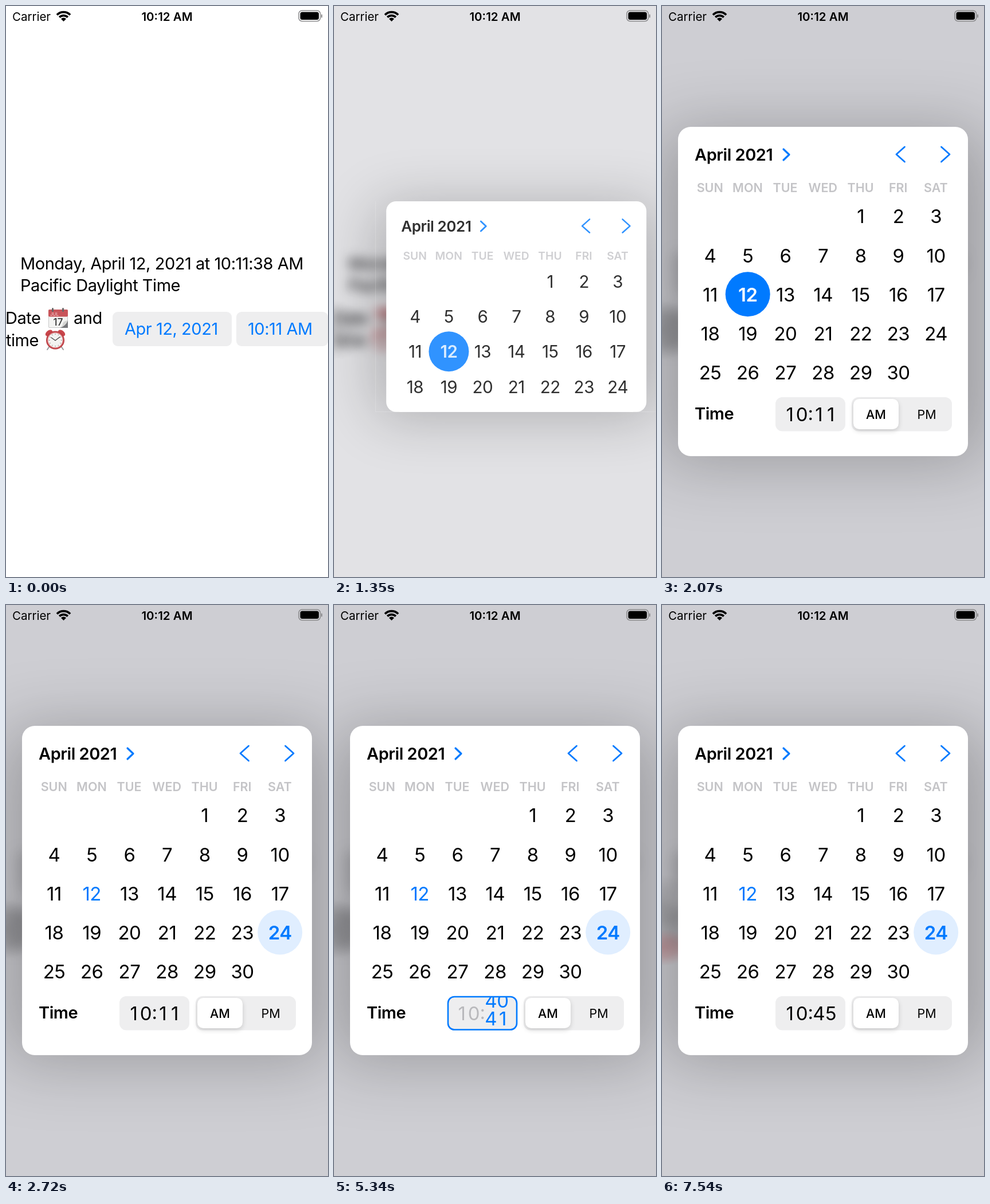
Recreate the animation shown at these times as an HTML page with a canvas. Size 562x997 px, loop 8 s.

```html
<!DOCTYPE html>
<html lang="en">
<head>
<meta charset="utf-8">
<title>Date picker</title>
<style>
html, body { margin: 0; width: 100%; height: 100%; overflow: hidden; background: #fff; }
canvas { display: block; width: 562px; height: 997px; }
</style>
</head>
<body>
<canvas id="stage" width="562" height="997"></canvas>
<script>
const W = 562, H = 997, LOOP = 8000;
const OPEN = 1283, OPENED = 2070, PICK_DAY = 2720;
const SPIN = 4280, SPUN = 6310, RELAYOUT = 5990, BLUR_FIELD = 7540;
const BLUE = '#007aff', FILL = '#eeeeef', BLACK = '#000';
const CHIP = { x: 185, y: 534, w: 377, h: 60 };
const CARD = { x: 28, y: 211, w: 506, h: 575 };

const screen = document.getElementById('stage').getContext('2d');
let g = screen;

const clamp = v => Math.max(0, Math.min(1, v));
const mix = (a, b, p) => a + (b - a) * p;

function text(s, x, y, size, color = BLACK, weight = 400, align = 'left') {
  g.font = `${weight} ${size}px Inter, "Liberation Sans", sans-serif`;
  g.letterSpacing = (size > 25 ? -0.016 * size : 0) + 'px';
  g.textAlign = align;
  g.fillStyle = color;
  g.fillText(s, x, y);
}

function box(x, y, w, h, r, color) {
  g.beginPath();
  g.roundRect(x, y, w, h, r);
  g.fillStyle = color;
  g.fill();
}

function disc(x, y, r, color) {
  g.beginPath();
  g.arc(x, y, r, 0, 7);
  g.fillStyle = color;
  g.fill();
}

function line(points, width, color) {
  g.beginPath();
  points.forEach(([x, y]) => g.lineTo(x, y));
  g.lineWidth = width;
  g.lineCap = g.lineJoin = 'round';
  g.strokeStyle = color;
  g.stroke();
}

function shadow(color, blur, dy) {
  g.shadowColor = color;
  g.shadowBlur = blur;
  g.shadowOffsetY = dy;
}

const noShadow = () => shadow('transparent', 0, 0);

// Chevron with its tip at x; dx is negative when it points right.
const chevron = (x, y, dx, dy, width) =>
  line([[x + dx, y - dy], [x, y], [x + dx, y + dy]], width, BLUE);

function calendarIcon() {
  box(74, 530, 34, 32, 2, '#c9c9c9');
  box(75, 531, 32, 30, 1, '#f4f4f2');
  box(74, 530, 34, 12.5, 2, '#c8555a');
  text('JUL', 77, 541, 8, '#f0c4c4', 500);
  text('17', 91, 557.5, 17, '#333', 500, 'center');
  g.beginPath();
  g.moveTo(108, 549);
  g.quadraticCurveTo(104, 559, 94, 562);
  g.lineTo(108, 562);
  g.fillStyle = '#77777a';
  g.fill();
  g.beginPath();
  g.moveTo(107, 549);
  g.quadraticCurveTo(99, 551, 99, 555);
  g.quadraticCurveTo(99, 559, 94, 561);
  g.quadraticCurveTo(104, 559, 107, 549);
  g.fillStyle = '#d5d5d3';
  g.fill();
  box(80, 527, 3, 7, 1.5, '#666');
  box(98, 527, 3, 7, 1.5, '#666');
}

function clockIcon() {
  line([[76, 594], [72, 600]], 2, '#9b9b9d');
  line([[96, 594], [100, 600]], 2, '#9b9b9d');
  for (const side of [-1, 1]) {
    g.beginPath();
    g.ellipse(86 + side * 11, 571, 7, 4.5, side * 0.65, 0, 7);
    g.fillStyle = '#c9464b';
    g.fill();
  }
  disc(86, 583.5, 16, '#b93a40');
  disc(86, 583.5, 14.2, '#d9777a');
  disc(86, 583.5, 12.6, '#f3f3f1');
  for (let i = 0; i < 12; i++) {
    const a = i * Math.PI / 6, c = Math.cos(a), s = Math.sin(a);
    line([[86 + 10 * c, 583.5 + 10 * s], [86 + 11 * c, 583.5 + 11 * s]], 1, '#777');
  }
  line([[79, 579], [86, 584], [94, 578]], 1.3, '#444');
}

function chips() {
  box(186, 534, 208, 60, 9, FILL);
  box(402, 534, 160, 60, 9, FILL);
  text('Apr 12, 2021', 207, 574, 29, BLUE);
  text('10:11 AM', 422, 574, 29, BLUE);
}

function page() {
  g.fillStyle = '#fff';
  g.fillRect(0, 0, W, H);
  text('Monday, April 12, 2021 at 10:11:38 AM', 25, 459.5, 29);
  text('Pacific Daylight Time', 25, 498, 29);
  text('Date', -1, 555, 29);
  text('and', 118, 555, 29);
  text('time', 0, 593.5, 29);
  calendarIcon();
  clockIcon();
}

function statusBar() {
  text('Carrier', 11, 26, 20.5);
  text('10:12 AM', 281, 26, 20.5, BLACK, 600, 'center');
  const arc = (r, width) => {
    g.beginPath();
    g.arc(100.5, 27, r, -Math.PI * 0.75, -Math.PI * 0.25);
    g.lineWidth = width;
    g.lineCap = 'butt';
    g.strokeStyle = BLACK;
    g.stroke();
  };
  arc(16.4, 3.6);
  arc(10.4, 3.6);
  arc(3.2, 6.4);
  g.beginPath();
  g.roundRect(511, 8, 37.5, 18.5, 5.5);
  g.lineWidth = 1.5;
  g.strokeStyle = '#8a8a8c';
  g.stroke();
  box(513.5, 10.5, 32.5, 13.5, 3.5, BLACK);
  box(550, 14.5, 2, 6, 1, '#8a8a8c');
}

function days(t) {
  const picked = t < PICK_DAY ? 12 : 24;
  for (let d = 1; d <= 30; d++) {
    const slot = d + 3;
    const x = 84 + 65.7 * (slot % 7), y = 367.3 + 68.2 * Math.floor(slot / 7);
    const today = d === 12, on = d === picked;
    if (on) disc(x, y - 0.5, 39, today ? BLUE : '#e0eeff');
    const color = on && today ? '#fff' : on || today ? BLUE : BLACK;
    text(d, x, y + 12, 33, color, on ? 600 : 400, 'center');
  }
}

// Digits with a fixed pitch.
const digits = (s, x, y, color) =>
  [...String(s)].forEach((c, i) => text(c, x + 20.8 * i, y, 33, color, 400, 'center'));

function minuteAt(t) {
  const k = 1.755, total = (SPUN - SPIN) / 1000;
  const s = Math.min(total, (t - SPIN) / 1000), end = Math.exp(-k * total);
  return 45 - 33 * (Math.exp(-k * s) - end) / (1 - end);
}

function timeField(t) {
  const active = t >= SPIN && t < BLUR_FIELD;
  const color = active ? '#b9b9bc' : BLACK;
  box(198, 683, 122, 59.5, 12, FILL);
  digits('10', 223, 725, color);
  text(':', 259, 722.5, 33, color, 400, 'center');
  if (!active) {
    digits(t < SPIN ? 11 : 45, 273.6, 725, BLACK);
    return;
  }
  const v = minuteAt(t);
  g.save();
  g.beginPath();
  g.roundRect(199, 684, 120, 57.5, 11);
  g.clip();
  const alpha = g.globalAlpha;
  for (let n = Math.floor(v) - 1; n <= Math.floor(v) + 2; n++) {
    const d = n - v;
    g.globalAlpha = alpha * (1 - 0.5 * clamp((Math.abs(d) - 0.7) / 0.3));
    digits(n, 273.6, 724.5 + 31 * d, BLUE);
  }
  g.restore();
  g.beginPath();
  g.roundRect(199, 684, 120, 57.5, 11);
  g.lineWidth = 2.6;
  g.strokeStyle = BLUE;
  g.stroke();
}

function amPm() {
  box(331, 683, 175, 59.5, 12, FILL);
  shadow('rgba(0,0,0,.16)', 9, 3);
  box(334, 686, 79, 53, 10.5, '#fff');
  noShadow();
  text('AM', 373.5, 720.5, 21.5, BLACK, 500, 'center');
  text('PM', 462, 720.5, 21.5, BLACK, 400, 'center');
}

function picker(t) {
  text('April 2021', 57, 269.5, 29, BLACK, 600);
  chevron(222, 259.5, -10, 9.5, 3.2);
  chevron(409, 259, 14.5, 13, 2.8);
  chevron(502, 259, -14.5, 13, 2.8);
  ['SUN', 'MON', 'TUE', 'WED', 'THU', 'FRI', 'SAT'].forEach((name, i) =>
    text(name, 83.7 + 65.7 * i, 325, 21.5, '#c4c4c7', 600, 'center'));
  days(t);
  text('Time', 57, 721.5, 29, BLACK, 600);
  timeField(t);
  amPm();
}

function smudge(x, y, rx, ry, rgb, alpha) {
  g.save();
  g.translate(x, y);
  g.scale(rx, ry);
  const fade = g.createRadialGradient(0, 0, 0, 0, 0, 1);
  fade.addColorStop(0, `rgba(${rgb},${alpha})`);
  fade.addColorStop(0.5, `rgba(${rgb},${alpha * 0.7})`);
  fade.addColorStop(1, `rgba(${rgb},0)`);
  g.fillStyle = fade;
  g.fillRect(-1, -1, 2, 2);
  g.restore();
}

function backdrop(t, p) {
  g.fillStyle = '#fff';
  g.fillRect(0, 0, W, H);
  g.filter = p > 0 ? `blur(${16 * p}px)` : 'none';
  g.drawImage(base, 0, 0);
  g.filter = 'none';
  g.fillStyle = `rgba(12,12,35,${0.2 * p})`;
  g.fillRect(0, 0, W, H);
  if (t < RELAYOUT) {
    smudge(0, 566, 60, 52, '90,90,92', 0.3 * p);
  } else {
    smudge(0, 525, 60, 55, '100,100,102', 0.26 * p);
    smudge(0, 598, 55, 32, '190,95,100', 0.4 * p);
  }
}

// Draws a layer laid out in `home` so that it follows the card.
function follow(card, home, alpha, draw) {
  if (alpha <= 0) return;
  const s = card.w / home.w;
  g.save();
  g.globalAlpha = alpha;
  g.translate(card.x, card.y);
  g.scale(s, s);
  g.translate(-home.x, -home.y);
  draw();
  g.restore();
}

function popover(t, p) {
  const c = {};
  for (const key in CARD) c[key] = mix(CHIP[key], CARD[key], p);
  const r = mix(10, 22, p), spread = 30 * p;
  shadow(`rgba(0,0,0,${mix(0.2, 0.26, p)})`, mix(70, 120, p), 8);
  box(c.x - spread, c.y, c.w + 2 * spread, c.h, r, '#fff');
  noShadow();
  // Repaint the backdrop tint where the shadow caster is wider than the card.
  if (spread > 0) sideShade(c, spread, p);
  g.save();
  g.beginPath();
  g.roundRect(c.x, c.y, c.w, c.h, r);
  g.fillStyle = '#fff';
  g.fill();
  g.clip();
  follow(c, CHIP, 1 - clamp((p - 0.05) / 0.5), chips);
  follow(c, CARD, clamp((p - 0.15) / 0.55), () => picker(t));
  g.restore();
}

function sideShade(c, spread, p) {
  g.save();
  g.beginPath();
  g.rect(c.x - spread - 1, c.y, spread + 24, c.h);
  g.rect(c.x + c.w - 23, c.y, spread + 24, c.h);
  g.clip();
  backdrop(time, p);
  // The caster is parked off stage so that only its shadow lands here.
  shadow(`rgba(0,0,0,${mix(0.2, 0.26, p)})`, mix(70, 120, p), 8);
  g.shadowOffsetX = 2000;
  box(c.x - spread - 2000, c.y, c.w + 2 * spread, c.h, 22, '#fff');
  g.restore();
}

function progress(t) {
  if (t < 1290) return 0;
  if (t >= OPENED) return 1;
  const x = 0.0296 * (t - OPEN);
  return 1 - (1 + x) * Math.exp(-x);
}

const base = document.createElement('canvas');
base.width = W;
base.height = H;
g = base.getContext('2d');
page();
g = screen;

let time = 0;
const start = performance.now();

function frame() {
  time = (performance.now() - start) % LOOP;
  const p = progress(time);
  backdrop(time, p);
  if (p > 0) popover(time, p);
  else chips();
  statusBar();
  requestAnimationFrame(frame);
}
frame();
</script>
</body>
</html>
```
